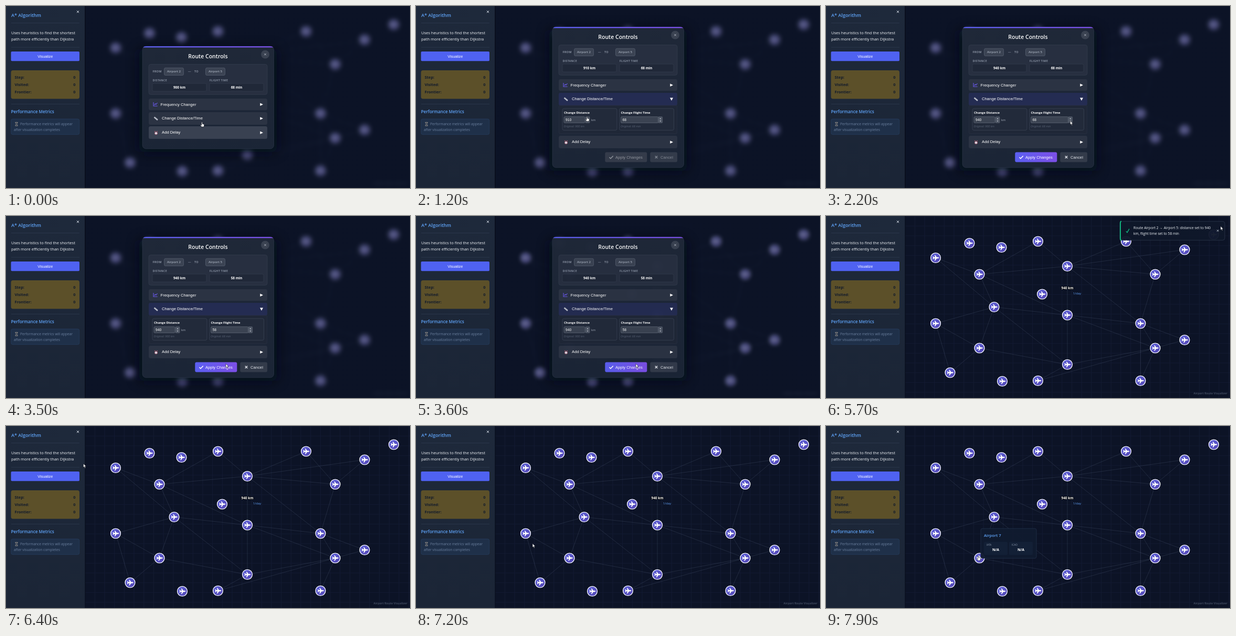
Animation, 770 px wide and 348 px high, one loop 8 s. Source, as an HTML page:

```html
<!DOCTYPE html>
<html lang="en">
<head>
<meta charset="utf-8">
<title>Airport Route Visualizer</title>
<style>
html, body { margin: 0; width: 100%; height: 100%; overflow: hidden; background: #0c1326; }
svg { display: block; width: 770px; height: 348px; }
text { font-family: "Open Sans", "Noto Sans", sans-serif; white-space: pre; }
text.ui { font-family: "Liberation Sans", Arial, sans-serif; }
</style>
</head>
<body>
<svg id="stage" viewBox="0 0 770 348">
  <defs>
    <linearGradient id="side" x2="0" y2="1"><stop stop-color="#1e293b"/><stop offset="1" stop-color="#1b2536"/></linearGradient>
    <linearGradient id="panel" x2="0" y2="1"><stop stop-color="#1f2838"/><stop offset="1" stop-color="#1b2536"/></linearGradient>
    <linearGradient id="accent"><stop stop-color="#5b5ff0"/><stop offset="1" stop-color="#7c4fe6"/></linearGradient>
    <linearGradient id="node" x2="1" y2="1"><stop stop-color="#5d62d8"/><stop offset="1" stop-color="#5345b4"/></linearGradient>
    <pattern id="grid" width="18.7" height="18.7" patternUnits="userSpaceOnUse" x="150">
      <path d="M0 .5H18.7M.5 0V18.7" stroke="#6474c8" stroke-opacity=".07"/>
    </pattern>
    <filter id="blur" filterUnits="userSpaceOnUse" x="100" y="-30" width="700" height="410" color-interpolation-filters="sRGB">
      <feGaussianBlur id="blurAmount" stdDeviation="4"/>
    </filter>
    <filter id="glow" filterUnits="userSpaceOnUse" x="260" y="220" width="230" height="100"><feGaussianBlur stdDeviation="3"/></filter>
    <filter id="shade" filterUnits="userSpaceOnUse" x="190" y="-40" width="390" height="430"><feGaussianBlur stdDeviation="13"/></filter>
  </defs>
</svg>
<script>
const LOOP = 8000;
const stage = document.getElementById('stage');

function add(parent, tag, attrs = {}) {
  const el = document.createElementNS('http://www.w3.org/2000/svg', tag);
  for (const k in attrs) el.setAttribute(k, attrs[k]);
  parent.append(el);
  return el;
}
const group = (parent, attrs) => add(parent, 'g', attrs);
const path = (parent, d, attrs) => add(parent, 'path', { d, fill: 'none', ...attrs });
const rect = (parent, x, y, width, height, rx, fill, attrs) =>
  add(parent, 'rect', { x, y, width, height, rx, fill, ...attrs });
// cy is the vertical middle of the line
function label(parent, str, x, cy, size, fill, attrs) {
  const el = add(parent, 'text', { x, y: cy + size * 0.36, 'font-size': size, fill, ...attrs });
  el.textContent = str;
  return el;
}
const move = (el, x, y) => el.setAttribute('transform', `translate(${x} ${y})`);
const fade = (el, o) => {
  el.setAttribute('opacity', o);
  el.style.display = o > 0 ? '' : 'none';
};
const MID = { 'text-anchor': 'middle' };
const SEMI = { 'font-weight': 600 };
const BOLD = { 'font-weight': 700 };
const UI = { class: 'ui' };

// Map
rect(stage, 0, 0, 770, 348, 0, '#0c1326');
const map = group(stage);
rect(map, 150, 0, 620, 348, 0, 'url(#grid)');
const nodes = {
  A: [209, 80], B: [273.5, 52], C: [334.5, 60], D: [404, 48.5], E: [292.5, 111.5], F: [460, 96],
  G: [572, 48.5], H: [683.5, 64.5], I: [739, 35.5], J: [627.5, 111.5], K: [412, 149.5], L: [320.5, 174],
  M: [460, 189.5], N: [209, 205.5], O: [292.5, 252.5], P: [236.5, 299.5], Q: [336, 316], R: [404, 315],
  S: [460, 284], T: [599.5, 205.5], U: [627.5, 252.5], V: [683.5, 237], W: [599.5, 315]
};
const edges = 'AE AL ED EF EL EM DF FG FH FJ FT FM GJ HJ JT LN LO LM LS NO NP OP OS MT MU MS RS RU SU TU TV TW UV UW';
const line = ([a, b]) => `M${nodes[a]}L${nodes[b]}`;
path(map, edges.split(' ').map(line).join(''), { stroke: '#8795b5', 'stroke-opacity': 0.22, 'stroke-width': 0.8 });
const hot = group(map, { 'stroke-linecap': 'round' });
path(hot, line('OS'), { stroke: '#3b82f6', 'stroke-width': 8, filter: 'url(#glow)', opacity: 0.75 });
path(hot, line('OS'), { stroke: '#5b97e2', 'stroke-width': 4 });
const PLANE = 'M6.4 0C6.4 .7 5.2 1.2 4.3 1.2H2L-.8 5.2H-2.2L-.9 1.2H-3.3L-4.6 2.8H-5.7L-4.9 0L-5.7-2.8H-4.6L-3.3-1.2H-.9L-2.2-5.2H-.8L2-1.2H4.3C5.2-1.2 6.4-.7 6.4 0Z';
for (const [x, y] of Object.values(nodes)) {
  const n = group(map, { transform: `translate(${x} ${y})` });
  add(n, 'circle', { r: 9.4, fill: 'url(#node)', stroke: '#f4f5ff', 'stroke-width': 1.4 });
  path(n, PLANE, { fill: '#fff' });
}
label(map, '940 km', 460, 137.5, 6.4, '#fff', { ...MID, ...BOLD, stroke: '#000', 'stroke-width': 1.2, 'paint-order': 'stroke' });
label(map, '1/day', 478.5, 148, 6, '#5f9df0', MID);
label(map, 'Airport Route Visualizer', 765, 339, 5.65, '#4a5468', { ...SEMI, 'text-anchor': 'end' });

// Sidebar
const side = group(stage);
rect(side, 150, 0, 2, 348, 0, '#000', { opacity: 0.2 });
rect(side, 0, 0, 150, 348, 0, 'url(#side)');
const cross = (parent, x, y, r, stroke, width = 1) =>
  path(parent, `M${x - r} ${y - r}l${2 * r} ${2 * r}m0 ${-2 * r}l${-2 * r} ${2 * r}`, { stroke, 'stroke-width': width });
cross(side, 137, 11, 2.1, '#d5dbe5');
label(side, 'A* Algorithm', 10, 18, 9.1, '#60a5fa', SEMI);
for (const y of [32.5, 79, 187.5]) path(side, `M10 ${y}H140`, { stroke: '#303d52', 'stroke-width': 0.7 });
label(side, 'Uses heuristics to find the shortest', 10, 51, 7.54, '#f3f6fa');
label(side, 'path more efficiently than Dijkstra', 10, 63.3, 7.54, '#f3f6fa');
rect(side, 9.5, 87, 130.5, 18.3, 2, '#4f62f2');
label(side, 'Visualize', 74.7, 96, 7.3, '#fff', { ...UI, ...MID });
rect(side, 9.5, 123, 130.5, 54.5, 4, '#5c5029');
['Step:', 'Visited:', 'Frontier:'].forEach((name, i) => {
  const y = 136.5 + i * 14;
  label(side, name, 16.5, y, 7.4, '#111a2c', BOLD);
  label(side, '0', 132.5, y, 7.4, '#111a2c', { ...BOLD, 'text-anchor': 'end' });
});
label(side, 'Performance Metrics', 9.5, 202, 8.15, '#60a5fa', SEMI);
rect(side, 9.7, 216, 130, 29.7, 3, '#1f3049', { stroke: '#263e5d', 'stroke-width': 0.8 });
path(side, 'M17.5 222.5h5M17.5 229h5M18.2 222.7v1.2l1.4 1.8-1.4 1.8v1.3M21.8 222.7v1.2l-1.4 1.8 1.4 1.8v1.3', { stroke: '#a49a8f', 'stroke-width': 0.9 });
label(side, 'Performance metrics will appear', 27, 225.7, 6.6, '#6c809f');
label(side, 'after visualization completes', 15, 236.5, 6.6, '#6c809f');

// Dialog, laid out from its own top edge
const dialog = group(stage);
const shadow = rect(dialog, 254, 6, 262, 200, 8, '#050816', { filter: 'url(#shade)', opacity: 0.75 });
const panel = rect(dialog, 260, 0, 250.5, 196, 7, 'url(#panel)', { stroke: '#323b4d', 'stroke-width': 0.6 });
path(dialog, 'M261 2.2Q263 0 267 0H503.5Q507.500 0 509.500 2.200Z', { fill: 'url(#accent)' });
label(dialog, 'Route Controls', 385, 18.8, 10.5, '#fff', { ...SEMI, ...MID });
add(dialog, 'circle', { cx: 494, cy: 15.5, r: 8, fill: '#3a4251' });
cross(dialog, 494, 15.5, 1.8, '#c9ced8', 0.8);
rect(dialog, 272, 34.5, 226, 57.8, 4, '#272f40', { stroke: '#363f50', 'stroke-width': 0.7 });
const CAPS = { 'letter-spacing': 0.3, ...SEMI };
label(dialog, 'FROM', 279.5, 48.3, 5.5, '#9fa8b7', CAPS);
label(dialog, 'TO', 359, 48.3, 5.5, '#9fa8b7', CAPS);
path(dialog, 'M347 48.500h5.500', { stroke: '#6f7888', 'stroke-width': 0.7 });
for (const [x, name] of [[301.5, 'Airport 2'], [380.5, 'Airport 5']]) {
  rect(dialog, x, 41.3, 37, 14.2, 2.5, '#3b4353', { stroke: '#555e6e', 'stroke-width': 0.8 });
  label(dialog, name, x + 18.5, 48.3, 6.1, '#a4adbb', { ...SEMI, ...MID });
}
label(dialog, 'DISTANCE', 279.5, 65, 5.3, '#98a2b2', CAPS);
label(dialog, 'FLIGHT TIME', 388, 65, 5.3, '#98a2b2', CAPS);
const stat = x => {
  rect(dialog, x, 71, 103, 15, 2.5, '#202838', { stroke: '#353e4f', 'stroke-width': 0.7 });
  return label(dialog, '', x + 51.5, 78.5, 6.5, '#fff', { ...BOLD, ...MID });
};
const distStat = stat(279), timeStat = stat(388);

function row(parent, y, h, name, x) {
  const box = rect(parent, 272, y, 226, h, 3.5, '#2b3343');
  label(parent, name, x, y + h / 2 - 0.3, 7.7, '#fff', UI);
  return box;
}
const RIGHT = 'M484.300 -2.800L490 0L484.300 2.800Z';
const DOWN = 'M484 -2.500H490L487 3Z';
const arrow = (parent, y, d) => path(parent, d, { fill: '#fff', transform: `translate(0 ${y})` });
row(dialog, 100, 22.2, 'Frequency Changer', 294.5);
path(dialog, 'M281 107v7.300h7.700M282.500 112.300l2-2.400 1.500 1.300 2.500-3.200', { stroke: '#6a58ec', 'stroke-width': 1.1 });
arrow(dialog, 111.3, RIGHT);
row(dialog, 126, 24, 'Change Distance/Time', 297);
const openRow = group(dialog);
rect(openRow, 272, 126, 226, 24, 3.5, '#242c52');
label(openRow, 'Change Distance/Time', 297, 137.7, 7.7, '#fff', UI);
path(dialog, 'M282.500 135.500L289 141', { stroke: '#b9bdc8', 'stroke-width': 2.6 });
path(dialog, 'M284 135.700l1-1M286 137.400l1-1M288 139l1-1', { stroke: '#636b7c', 'stroke-width': 0.5 });
const closedArrow = arrow(dialog, 138, RIGHT);
const openArrow = arrow(dialog, 138, DOWN);

const body = group(dialog);
rect(body, 272.3, 150, 225.4, 54.5, 3, '#1f2737', { stroke: '#2d3547', 'stroke-width': 0.6 });
function field(x, name, inputWidth, spinX, unit, original) {
  rect(body, x, 156, 104, 41.6, 3, '#222a3a', { stroke: '#3a4355', 'stroke-width': 0.8 });
  label(body, name, x + 3, 164.2, 5.9, '#fff', BOLD);
  rect(body, x + 3, 171.7, inputWidth, 11.8, 1.5, '#3b4352', { stroke: '#656d7b', 'stroke-width': 0.7 });
  rect(body, spinX, 171.7, 8, 11.8, 1, '#4b5362', { stroke: '#656d7b', 'stroke-width': 0.5 });
  path(body, `M${spinX + 2.6} 176.300l1.400-2 1.400 2ZM${spinX + 2.6} 179.200l1.400 2 1.400-2Z`, { fill: '#d4d8df' });
  if (unit) label(body, unit, spinX + 11, 177.8, 5.6, '#aab2bf');
  label(body, original, x + 2.6, 190, 5.4, '#596274', { 'font-style': 'italic' });
  return label(body, '', x + 6, 177.5, 6.7, '#fff', UI);
}
const distInput = field(279, 'Change Distance', 40, 323, 'km', 'Original: 900 km');
const timeInput = field(387.5, 'Change Flight Time', 71, 461.7, '', 'Original: 68 min');

const delay = group(dialog);
row(delay, 153, 24, 'Add Delay', 297);
const delayHover = group(delay);
rect(delayHover, 272, 153, 226, 24, 3.5, '#394151');
label(delayHover, 'Add Delay', 297, 164.7, 7.7, '#fff', UI);
add(delay, 'circle', { cx: 286, cy: 166.3, r: 2.6, fill: '#d8d9e4', stroke: '#a45a6c', 'stroke-width': 1 });
path(delay, 'M283.200 163.300l1.300-1M288.800 163.300l-1.300-1', { stroke: '#a45a6c', 'stroke-width': 1.3 });
arrow(delay, 165.3, RIGHT);

const footer = group(dialog);
const applyOff = rect(footer, 360.3, 239.5, 80, 19, 3, '#343b4a');
const applyOn = rect(footer, 360.3, 239.5, 80, 19, 3, 'url(#accent)');
rect(footer, 446.3, 239.5, 51.7, 19, 3, '#333b4a');
const footerText = group(footer);
path(footerText, 'M368.500 249.300l2.400 2.400 4.800-5', { stroke: '#fff', 'stroke-width': 1.6 });
label(footerText, 'Apply Changes', 380, 248.8, 7.67, '#fff', UI);
cross(footerText, 458, 249, 2.3, '#e3e6ec', 1.3);
label(footerText, 'Cancel', 466, 248.8, 7.67, '#e3e6ec', UI);

// Toast
const toast = group(stage);
rect(toast, 560, 10.3, 200, 36, 4, '#0f172a', { 'fill-opacity': 0.96, stroke: '#2b364b', 'stroke-width': 0.8 });
path(toast, 'M563 10.300Q561 10.300 561 13V43.500Q561 46.300 563 46.300', { stroke: '#12b981', 'stroke-width': 1.9 });
path(toast, 'M572 29l2 2.600 4-7', { stroke: '#12c48a', 'stroke-width': 1.2 });
label(toast, 'Route Airport 2 → Airport 5: distance set to 940', 586, 23, 6.7, '#f1f5f9');
label(toast, 'km, flight time set to 58 min', 586, 33.7, 6.7, '#f1f5f9');
cross(toast, 746.7, 28, 1.7, '#cbd5e1', 0.9);

// Airport card
const card = group(stage);
rect(card, 295, 196, 106, 57, 3, '#101b2f', { 'fill-opacity': 0.96, stroke: '#22304a', 'stroke-width': 0.8 });
label(card, 'Airport 7', 301, 209, 7.7, '#60a5fa', SEMI);
for (const [x, name] of [[301, 'IATA'], [349, 'ICAO']]) {
  rect(card, x, 221.5, 45, 25, 2, '#132036');
  label(card, name, x + 5, 227.5, 4.7, '#8d99ad');
  label(card, 'N/A', x + 22.5, 237, 6.9, '#fff', { ...BOLD, ...MID });
}

// Pointer, its tip at the origin
const pointer = group(stage, { stroke: '#10131c', 'stroke-width': 0.6, 'stroke-linejoin': 'round' });
const arrowShape = path(pointer, 'M0 0V7.300L1.700 5.800L2.900 8.400L4.100 7.900L2.900 5.300H5.200Z', { fill: '#fff' });
const handShape = path(pointer, 'M-.8 .7Q0-.5 .8 .7V3.500L3.400 4.100Q4.300 4.400 4.200 5.400L3.600 9H-.7L-3 5.900Q-2.800 4.900-1.800 5.300L-.8 6.200Z', { fill: '#fff' });

// time, x, y, hand?
const track = [
  [0, 373.5, 222, 1], [300, 373.5, 222, 1], [800, 326, 211.5, 1], [1700, 326, 211.5, 1],
  [2000, 464, 219, 0], [2300, 466, 220, 0], [2800, 466, 220, 0], [3300, 421, 281, 0], [3400, 419, 282.5, 0],
  [3800, 419, 282.5, 0], [4200, 352, 262, 0], [4400, 303, 236, 0], [4600, 322, 205, 0], [5000, 420, 172, 0],
  [5400, 470, 155, 0], [5700, 752, 19.5, 0], [5900, 747, 26, 1], [6150, 747, 26, 0], [6400, 147.5, 72, 0],
  [6900, 212, 218, 0], [7100, 214, 222, 0], [7600, 290.5, 248, 1], [8000, 290.5, 248, 1]
];
const distances = [[0, 900], [1200, 910], [1400, 920], [1500, 930], [1700, 940]];
const minutes = [[0, 68], [2500, 63], [2700, 58]];

const last = (steps, t) => steps.filter(s => s[0] <= t).pop();
const ramp = (t, a, b) => {
  const p = Math.min(1, Math.max(0, (t - a) / (b - a)));
  return p * p * (3 - 2 * p);
};
const lerp = (a, b, p) => a + (b - a) * p;

function drawPointer(t) {
  const from = last(track, t);
  const to = track[Math.min(track.indexOf(from) + 1, track.length - 1)];
  const p = to === from ? 0 : ramp(t, from[0], to[0]);
  move(pointer, lerp(from[1], to[1], p), lerp(from[2], to[2], p));
  fade(handShape, from[3]);
  fade(arrowShape, 1 - from[3]);
}

function drawDialog(t) {
  const shown = 1 - ramp(t, 3580, 3800);
  const open = ramp(t, 200, 600);
  const enabled = ramp(t, 1210, 1500);
  const height = lerp(196, 269, open);
  fade(dialog, shown);
  move(dialog, 0, lerp(77, 40, open));
  panel.setAttribute('height', height);
  shadow.setAttribute('height', height);
  fade(openRow, open);
  fade(openArrow, open > 0.5 ? 1 : 0);
  fade(closedArrow, open > 0.5 ? 0 : 1);
  fade(body, ramp(t, 350, 600));
  move(delay, 0, 55 * open);
  fade(delayHover, 1 - ramp(t, 50, 250));
  fade(footer, ramp(t, 400, 650));
  fade(applyOn, enabled);
  fade(applyOff, 1 - enabled);
  fade(footerText, lerp(0.45, 1, enabled));
  const km = last(distances, t)[1], min = last(minutes, t)[1];
  distStat.textContent = km + ' km';
  timeStat.textContent = min + ' min';
  distInput.textContent = km;
  timeInput.textContent = min;

  fade(map, lerp(1, 0.5, shown));
  document.getElementById('blurAmount').setAttribute('stdDeviation', 4 * shown);
  if (shown > 0) map.setAttribute('filter', 'url(#blur)');
  else map.removeAttribute('filter');
}

function draw(t) {
  drawDialog(t);
  fade(hot, ramp(t, 3600, 3800) * (1 - ramp(t, 4420, 4600)));
  const leave = ramp(t, 6050, 6350);
  fade(toast, ramp(t, 3650, 3900) * (1 - leave));
  move(toast, 60 * (1 - ramp(t, 3650, 3900)) + 60 * leave, 0);
  fade(card, ramp(t, 7550, 7750));
  drawPointer(t);
}

const start = performance.now();
function tick() {
  draw((performance.now() - start) % LOOP);
  requestAnimationFrame(tick);
}
tick();
</script>
</body>
</html>
```
